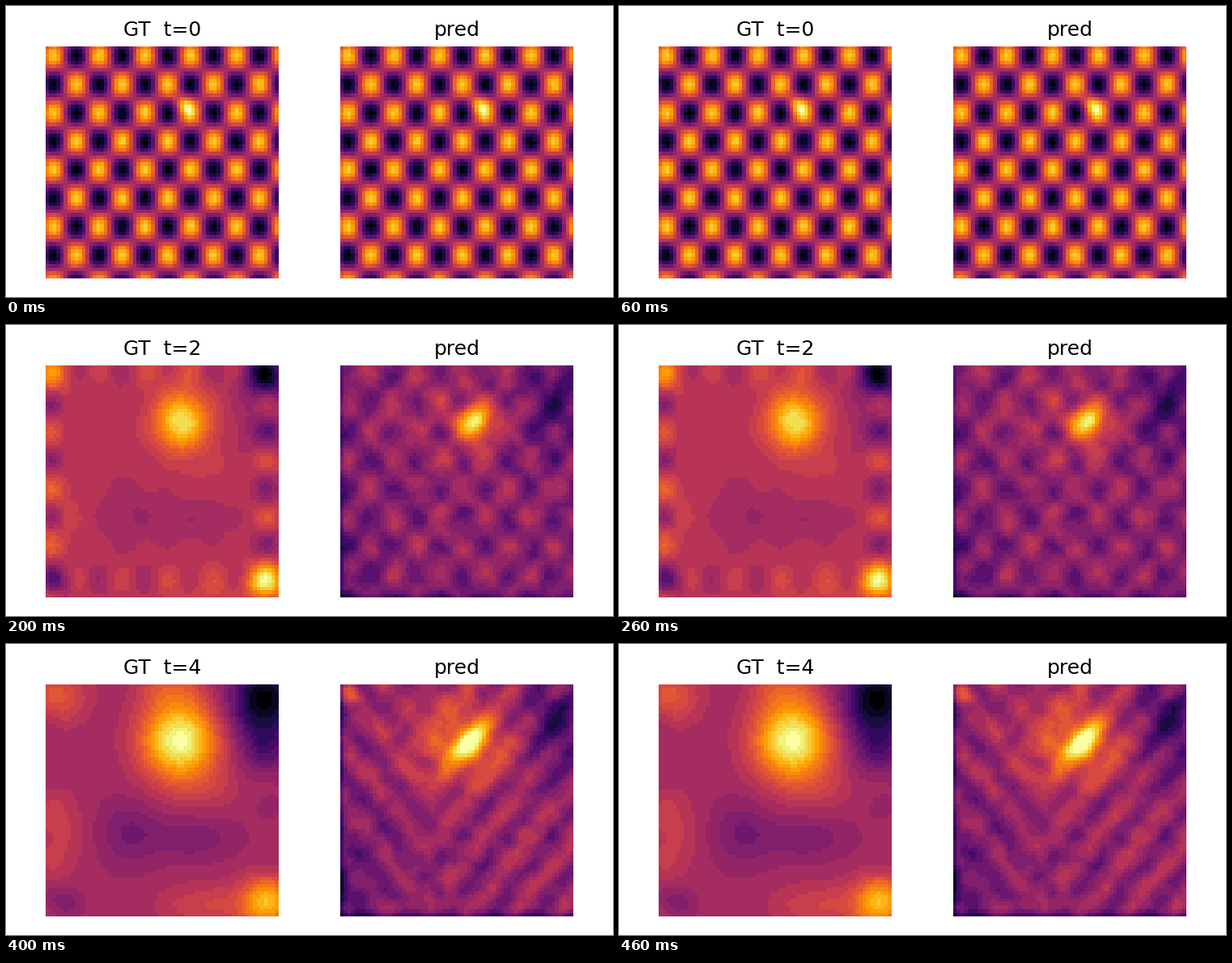
Animation of 750x360 px, one loop 500 ms. Source, as a matplotlib script:

```python
import numpy as np
import matplotlib.pyplot as plt
from matplotlib.animation import FuncAnimation

W, H, DPI = 750, 360, 150
N, STEPS = 64, 5
PANEL_W, PANEL_H = 287.8, 287

X, Y = np.meshgrid(np.arange(N) + 0.5, np.arange(N) + 0.5)
PX, PY = 0.5 * (X - 2.2), 0.4 * (Y - 2.6)
CHECK = np.cos(PX) * np.cos(PY)


def bell(d, s):
    return np.exp(-0.5 * (d / s) ** 2)


def spot(x, y, sx, sy=None):
    return bell(X - x, sx) * bell(Y - y, sy or sx)


def grain(seed, passes=3):
    """Smooth random texture with unit spread."""
    g = np.random.default_rng(seed).normal(size=(N, N))
    for axis in (0, 1):
        for _ in range(passes):
            g = (np.roll(g, 1, axis) + 2 * g + np.roll(g, -1, axis)) / 4
    return g / g.std()


def snap(v):
    """Coarse colour steps, a little finer towards the bright end."""
    steps = 22
    return (np.round(np.clip(v, 0, 1) ** 1.1 * steps) / steps) ** (1 / 1.1)


def start():
    return 0.45 + 0.43 * CHECK + 0.30 * spot(38, 16, 1.8)


def boundary_waves(t):
    """Checker left over along the four sides, fading with each step."""
    sides = bell(X - 1.5, 2.1) - bell(X - 61, 2.5)
    ends = bell(Y - 1.5, 2.5) - bell(Y - 59.5, 2.8)
    return (0.69 * 0.4 ** (t - 1) * np.cos(PY) * sides
            + 0.40 * 0.3 ** (t - 1) * np.cos(PX) * ends)


def truth(t):
    if t == 0:
        return start()
    spread, corner, late = t ** 0.5, 2.8 * t ** 0.45, 1 - 1 / t
    v = spot(38 - 0.3 * t, 15.5, 3.7 * spread, 3.9 * spread)
    v += 0.23 * 0.1 ** (t - 1) * CHECK + boundary_waves(t)

    # Corners: warm, cold, warm, cold
    v += 0.30 * spot(1 + 0.8 * t, 1.5 + 0.5 * t, corner)
    v -= 0.70 * spot(61.5 - 0.4 * t, 1 + 0.8 * t, 1.25 * corner, 1.35 * corner)
    v += (1.05 - 0.09 * t) * spot(61, 60.3, corner)
    v -= 0.90 * late / t * spot(1 + 1.2 * t, 60, 2.8)

    # Broad shapes that emerge as the fine pattern dies out
    v += late * (0.25 * spot(3, 41, 5, 9) + 0.28 * spot(44, 61, 9, 4.5)
                 + 0.30 * spot(34, 1, 6, 4) + 0.13 * spot(46, 29, 7, 4)
                 - 0.25 * spot(23, 41, 5.5, 6) - 0.22 * spot(40, 42.5, 8, 4)
                 - 0.35 * spot(60, 17, 5, 6))
    return (v - v.min()) / np.ptp(v)


def prediction(t):
    if t == 0:
        return start()
    late = 1 - 1 / t
    x, y = 38.9 - 0.8 * t, 15.8
    across, along = X - x + Y - y, X - x - Y + y
    core = bell(across, 6 / t ** 0.5) * bell(along, 2.2 + t)
    v = 0.42 - 0.10 / t + 0.30 * core + 0.28 * spot(x, y, 2.5 * t ** 0.7)

    # The checker flips its sign, then turns into diagonal streaks
    if t == 1:
        rim = bell(X, 2.5) + bell(X - N, 1.2) + bell(Y - N, 1.2)
        v += 0.17 * CHECK * (1 + rim)
    else:
        right = 1 / (1 + np.exp((28 - X) / 4))
        streaks = (1 - right) * np.cos(PX - PY) - right * np.cos(PX + PY)
        v += 0.035 * (t - 2) * streaks - (0.18 - 0.04 * t) * CHECK
        v += 0.025 * grain(t)

    v += late * (0.14 * spot(29, 16, 11) + 0.22 * spot(2.5, 2.5, 1.8)
                 - 0.16 * spot(2, 56, 7, 12)
                 - 0.24 * bell(X, 0.8) - 0.24 * bell(Y - N, 1))
    return v - 0.24 * (1 - 0.65 / t) * spot(59, 10, 5, 9)


def panel(left, title, field):
    ax = fig.add_axes([left / W, 23 / H, PANEL_W / W, PANEL_H / H])
    ax.axis("off")
    img = ax.imshow(snap(field), cmap="inferno", vmin=0, vmax=1,
                    interpolation="nearest", aspect="auto")
    return img, ax.set_title(title, fontsize=12, pad=6.1)


plt.rcParams["font.family"] = "DejaVu Sans"
fig = plt.figure(figsize=(W / DPI, H / DPI), dpi=DPI, facecolor="white")
left_img, left_title = panel(49.2, "GT  t=0", truth(0))
right_img, _ = panel(413.1, "pred", prediction(0))


def draw(t):
    left_img.set_data(snap(truth(t)))
    right_img.set_data(snap(prediction(t)))
    left_title.set_text(f"GT  t={t}")
    return left_img, right_img, left_title


anim = FuncAnimation(fig, draw, frames=STEPS, interval=100, repeat=True,
                     repeat_delay=0, blit=False)
plt.show()
```
